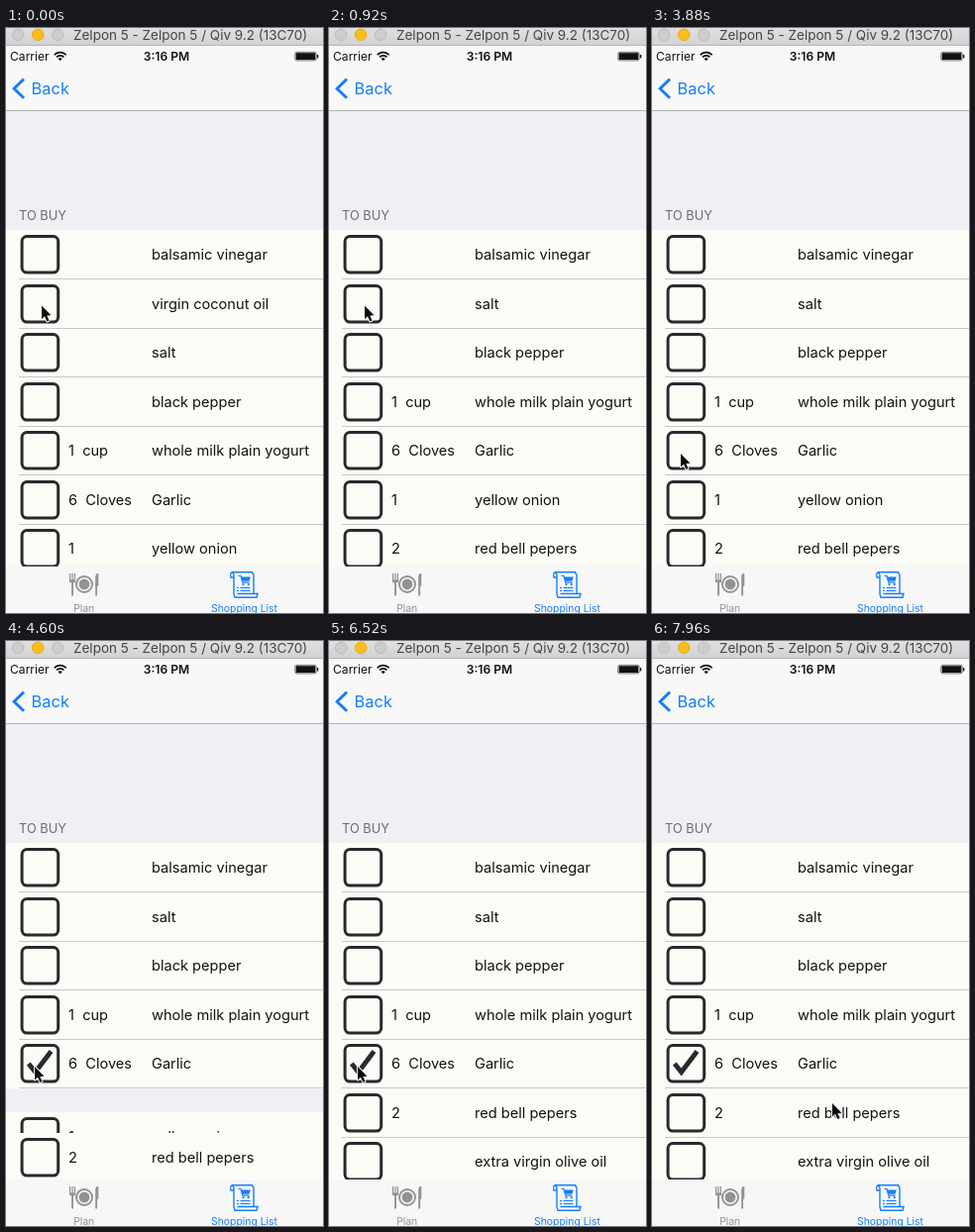
An HTML page with a canvas for the animation above (8000 ms loop, 320 by 591 pixels).

```html
<!DOCTYPE html>
<html lang="en">
<head>
<meta charset="utf-8">
<title>Shopping list</title>
<style>
html, body { margin: 0; width: 100%; height: 100%; overflow: hidden; background: #efeff4; }
canvas { display: block; width: 320px; height: 591px; }
</style>
</head>
<body>
<canvas id="stage"></canvas>
<script>
const W = 320, H = 591, LOOP = 8000;
const TOP = 204, PITCH = 49.5, TAB_Y = 544;
const BLUE = '#147efb', GREY = '#929292', INK = '#2b292e', CREAM = '#fcfbf6', PALE = '#efeff4', BAR = '#f8f8f8';

const canvas = document.getElementById('stage');
const ctx = canvas.getContext('2d');
const scale = window.devicePixelRatio || 1;
canvas.width = W * scale;
canvas.height = H * scale;

const items = [
  ['balsamic vinegar'],
  ['virgin coconut oil'],
  ['salt'],
  ['black pepper'],
  ['whole milk plain yogurt', '1  cup'],
  ['Garlic', '6  Cloves'],
  ['yellow onion', '1'],
  ['red bell pepers', '2'],
  ['extra virgin olive oil']
].map(([name, amount = '']) => ({ name, amount }));

// A tap ticks one row; after a pause the removed row collapses.
const PAUSE = 160, COLLAPSE = 300;
const taps = [
  { at: 35, ticked: 'virgin coconut oil', removed: 'virgin coconut oil' },
  { at: 4385, ticked: 'Garlic', removed: 'yellow onion' }
];

// The screen refreshes unevenly, and every 40 ms during the long pointer sweep.
const refreshes = [0, 40, 400, 920, 1800, 2400, 2960, 3360, 3480, 3600, 3880,
  4440, 4600, 4720, 4840, 5200, 6520, 7520, 7920, 7960];
const SWEEP = { from: 6680, to: 7440, step: 40 };

// Pointer strokes: end point and ease-out power for x and y.
const strokes = [
  { from: 1200, to: 1900, x: 36, y: 447, px: 1, py: 1 },
  { from: 2600, to: 3600, x: 29, y: 429.5, px: 1, py: 1 },
  { from: 6640, to: 7440, x: 182, y: 480.5, px: 2.5, py: 1.5 },
  { from: 7840, to: 7960, x: 182, y: 466.5, px: 1, py: 1 }
];

const clamp = k => Math.max(0, Math.min(1, k));
const easeOut = (k, power) => 1 - (1 - k) ** power;
const smooth = k => k * k * (3 - 2 * k);

function screenTime(t) {
  if (t >= SWEEP.from && t < refreshes.find(r => r > SWEEP.to)) {
    return Math.min(SWEEP.to, Math.floor(t / SWEEP.step) * SWEEP.step);
  }
  return refreshes.findLast(r => r <= t);
}

function pointerAt(t) {
  let x = 36, y = 280;
  for (const s of strokes) {
    const k = clamp((t - s.from) / (s.to - s.from));
    x += (s.x - x) * easeOut(k, s.px);
    y += (s.y - y) * easeOut(k, s.py);
  }
  return [x, y];
}

function rect(x, y, w, h, color) {
  ctx.fillStyle = color;
  ctx.fillRect(x, y, w, h);
}

function text(str, x, y, size, color, align = 'left', weight = 400) {
  ctx.font = `${weight} ${size}px Inter, Roboto, "Liberation Sans", sans-serif`;
  ctx.textAlign = align;
  ctx.fillStyle = color;
  ctx.fillText(str, x, y);
}

function trace(points, closed) {
  ctx.beginPath();
  points.forEach(([x, y], i) => i ? ctx.lineTo(x, y) : ctx.moveTo(x, y));
  if (closed) ctx.closePath();
}

function stroke(color, width) {
  ctx.strokeStyle = color;
  ctx.lineWidth = width;
  ctx.stroke();
}

function line(points, color, width, closed) {
  trace(points, closed);
  stroke(color, width);
}

function shape(points, color) {
  trace(points, true);
  ctx.fillStyle = color;
  ctx.fill();
}

function arc(x, y, r, color, width, from = 0, to = Math.PI * 2) {
  ctx.beginPath();
  ctx.arc(x, y, r, from, to);
  stroke(color, width);
}

function disc(x, y, r, color) {
  ctx.beginPath();
  ctx.arc(x, y, r, 0, Math.PI * 2);
  ctx.fillStyle = color;
  ctx.fill();
}

function box(x, y, w, h, r, color, width) {
  ctx.beginPath();
  ctx.roundRect(x, y, w, h, r);
  stroke(color, width);
}

function drawRow({ name, amount }, top, ticked) {
  const y = Math.round(top);
  rect(0, y, W, PITCH + 1, CREAM);
  box(16.1, y + 6.5, 36.6, 36.6, 5, INK, 3);
  if (ticked) {
    line([[22.8, y + 25], [29.6, y + 33.5], [45.5, y + 12.5]], INK, 4.8);
  }
  text(amount, 63, y + 30, 14.6, '#111');
  text(name, 147, y + 30, 14.6, '#111');
}

function drawList(t) {
  const done = tap => t >= tap.at + PAUSE + COLLAPSE;
  const active = taps.find(tap => t >= tap.at && !done(tap));
  const rows = items.filter(({ name }) => !taps.some(tap => done(tap) && tap.removed === name));
  const cut = active ? rows.findIndex(({ name }) => name === active.removed) : rows.length;
  const p = active ? smooth(clamp((t - active.at - PAUSE) / COLLAPSE)) : 0;

  ctx.save();
  ctx.beginPath();
  ctx.rect(0, TOP, W, TAB_Y - TOP);
  ctx.clip();
  rect(0, TOP, W, TAB_Y - TOP, PALE);
  rows.forEach((item, i) => {
    let y = TOP + i * PITCH;
    if (i === cut && p > 0) y += PITCH / 2;
    if (i > cut) y -= PITCH * p;
    drawRow(item, y, taps.some(tap => t >= tap.at && tap.ticked === item.name));
  });
  // Separators below the removed row stay hidden while it collapses.
  for (let i = 1; i <= cut; i++) {
    rect(13, Math.round(TOP + i * PITCH - 0.5), W - 13, 1, '#c8c7cb');
  }
  ctx.restore();
}

function drawWindowBar() {
  const shade = ctx.createLinearGradient(0, 0, 0, 17);
  shade.addColorStop(0, '#e0dfe1');
  shade.addColorStop(1, '#d2d1d3');
  rect(0, 0, W, 17, shade);
  rect(0, 17, W, 1, '#b5b4b5');
  for (let i = 0; i < 3; i++) {
    const x = 12.2 + 20 * i;
    disc(x, 6.8, 6, i === 1 ? '#f9bd1c' : '#cdccce');
    arc(x, 6.8, 5.8, i === 1 ? '#e2a81c' : '#b9b8ba', 0.8);
  }
  text('Zelpon 5 - Zelpon 5 / Qiv 9.2 (13C70)', 68, 12, 13.5, '#454445');
}

function drawHeader() {
  rect(0, 18, W, 65, BAR);
  rect(0, 83, W, 1, '#b4b4b7');
  text('Carrier', 4, 33, 12.1, '#111');
  text('3:16 PM', 162, 33, 12.1, '#111', 'center', 600);

  for (const r of [4.8, 8]) arc(54.7, 32.6, r, '#111', 1.7, -Math.PI * 0.77, -Math.PI * 0.23);
  shape([[54.7, 33.2], [52.6, 30.9], [54.7, 30], [56.8, 30.9]], '#111');

  box(291.8, 24.3, 21.4, 8.6, 2, '#111', 0.6);
  rect(292.7, 25.2, 19.6, 6.8, '#111');
  rect(314, 27, 1.3, 3.4, '#111');

  line([[18, 51.6], [8.1, 61.2], [18, 70.8]], BLUE, 2.9);
  text('Back', 25.6, 67, 16.4, BLUE);
  text('TO BUY', 13, 194, 12.8, '#6d6d72');
}

function drawPlanIcon() {
  const x = 79, y = 562;
  for (let i = 0; i < 3; i++) rect(64 + 2.4 * i, 551, 1.2, 8, GREY);
  rect(64, 557.5, 6, 2.6, GREY);
  rect(66.1, 560, 1.9, 13.5, GREY);
  disc(x, y, 5.4, GREY);
  arc(x, y, 8, GREY, 1.9);
  shape([[90.2, 573.5], [90.2, 554], [91.3, 551.2], [93.3, 551], [93.3, 563.5], [92.1, 564], [92.1, 573.5]], GREY);
}

function drawListIcon() {
  line([[230, 571], [230, 552.5], [228.5, 549.8], [248.5, 549.8], [250, 552.5], [250, 571]], BLUE, 1.4);
  line([[230, 555], [226.8, 555], [226.8, 551], [228.5, 549.8]], BLUE, 1.3);
  line([[233.5, 571.5], [254, 571.5], [253, 575.3], [231, 575.3], [229.8, 571]], BLUE, 1.4);
  line([[234.5, 553.5], [237, 553.5], [238.8, 560.2], [245.5, 560.2]], BLUE, 1.2);
  shape([[237.3, 554.5], [246.7, 554.5], [245.5, 558.8], [238.4, 558.8]], BLUE);
  disc(239.5, 562.2, 1.1, BLUE);
  disc(244.7, 562.2, 1.1, BLUE);
  for (const y of [565, 568]) {
    rect(233, y, 2, 1.1, BLUE);
    rect(236.5, y, 10, 1.1, BLUE);
  }
}

function drawTabs() {
  rect(0, TAB_Y, W, H - TAB_Y, '#f7f7f7');
  drawPlanIcon();
  drawListIcon();
  text('Plan', 78.7, 590, 10.4, GREY, 'center');
  text('Shopping List', 240.5, 590, 10.4, BLUE, 'center');
}

function drawPointer([x, y]) {
  ctx.save();
  ctx.translate(x, y);
  ctx.lineJoin = 'round';
  line([[0, 0.5], [0, 14], [3, 11.2], [5.4, 16.6], [7.6, 15.6], [5.3, 10.4], [9.5, 10.2]], '#fff', 1.8, true);
  ctx.fillStyle = '#0c0c0c';
  ctx.fill();
  ctx.restore();
}

function draw(t) {
  ctx.setTransform(scale, 0, 0, scale, 0, 0);
  rect(0, 0, W, H, PALE);
  drawWindowBar();
  drawHeader();
  drawList(t);
  drawTabs();
  drawPointer(pointerAt(t));
}

const began = performance.now();
function tick() {
  draw(screenTime((performance.now() - began) % LOOP));
  requestAnimationFrame(tick);
}
tick();
</script>
</body>
</html>
```
